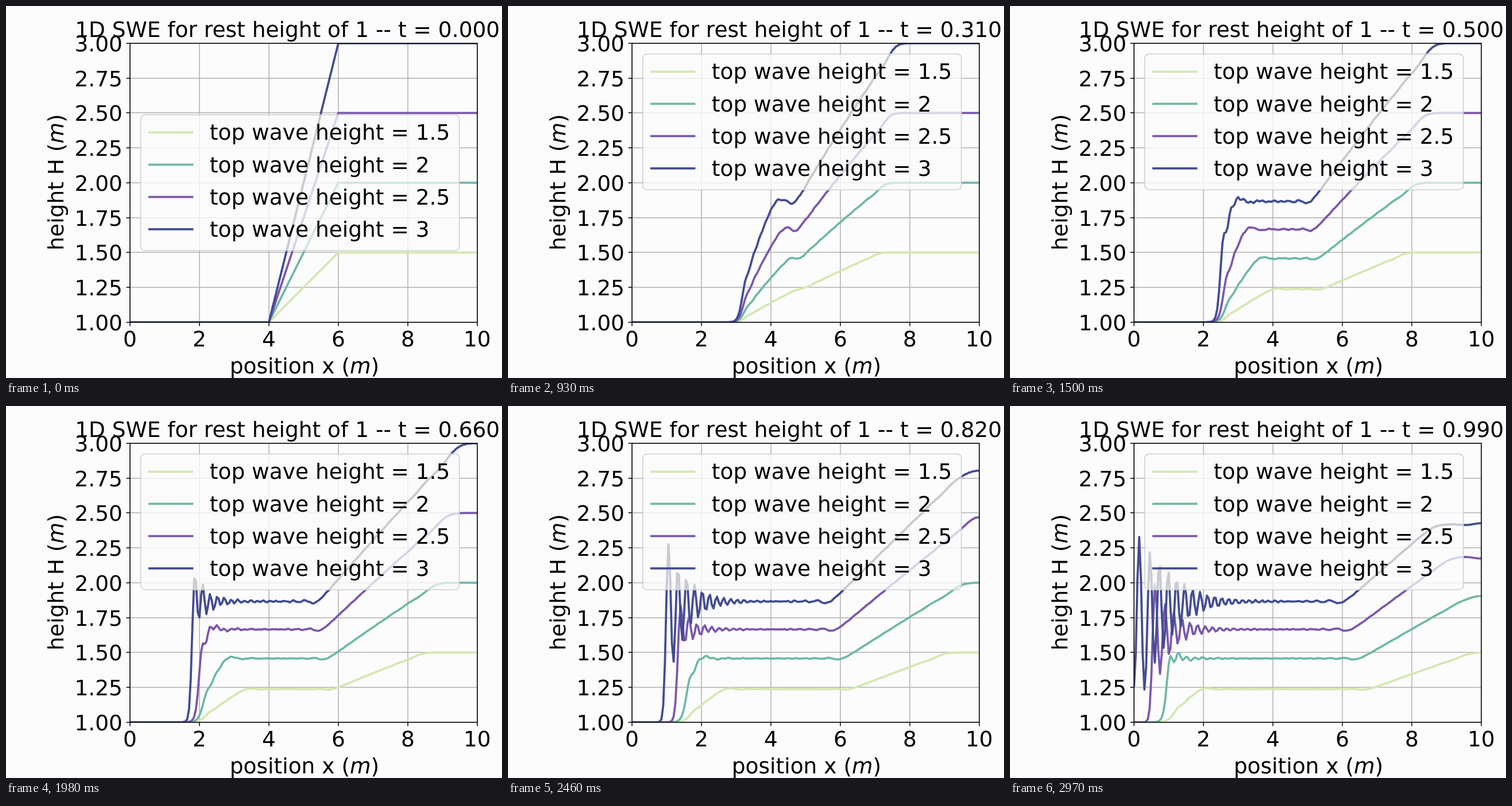
Write an HTML page with a canvas that moves like this. It is 864 px wide and 648 px high and loops after 3 s.

```html
<!DOCTYPE html>
<html>
<head>
<meta charset="utf-8">
<style>
html, body { margin: 0; width: 100%; height: 100%; overflow: hidden; background: #fcfcfc; }
canvas { display: block; }
</style>
</head>
<body>
<canvas id="stage" width="864" height="648"></canvas>
<script>
const ctx = document.getElementById('stage').getContext('2d');
const EM = 37.5, FRAMES = 100, FRAME_MS = 30;
const LEFT = 216, RIGHT = 820.8, TOP = 64.8, BOTTOM = 550.8;
const px = x => LEFT + x * (RIGHT - LEFT) / 10;
const py = h => BOTTOM - (h - 1) * (BOTTOM - TOP) / 2;

const waves = [
  { top: 1.5, color: '#d4e7b1', pale: '#f3f8ec' },
  { top: 2, color: '#6fb8a6', pale: '#d3e6e0' },
  { top: 2.5, color: '#7b58ab', pale: '#d8d5e6' },
  { top: 3, color: '#434c92', pale: '#cacad2' }
];

// Shallow water equations for height h and flow q: central differences, RK4, solid walls.
const N = 201, DX = 10 / (N - 1), G = 9.81, SUBSTEPS = 4, DT = 0.01 / SUBSTEPS;

function slope([h, q]) {
  const dh = new Float64Array(N), dq = new Float64Array(N);
  const force = i => q[i] * q[i] / h[i] + G * h[i] * h[i] / 2;
  for (let i = 1; i < N - 1; i++) {
    dh[i] = (q[i - 1] - q[i + 1]) / (2 * DX);
    dq[i] = (force(i - 1) - force(i + 1)) / (2 * DX);
  }
  dh[0] = -q[1] / DX;
  dh[N - 1] = q[N - 2] / DX;
  return [dh, dq];
}

const add = (s, k, f) => s.map((a, j) => a.map((v, i) => v + f * k[j][i]));

function step(s) {
  const a = slope(s), b = slope(add(s, a, DT / 2));
  const c = slope(add(s, b, DT / 2)), d = slope(add(s, c, DT));
  return [[a, 1], [b, 2], [c, 2], [d, 1]].reduce((r, [k, w]) => add(r, k, w * DT / 6), s);
}

function simulate(top) {
  const ramp = (_, i) => 1 + (top - 1) * Math.min(1, Math.max(0, (i * DX - 4) / 2));
  let state = [Float64Array.from({ length: N }, ramp), new Float64Array(N)];
  const frames = [];
  for (let n = 0; n < FRAMES; n++) {
    frames.push(state[0]);
    for (let j = 0; j < SUBSTEPS; j++) state = step(state);
  }
  return frames;
}
for (const w of waves) w.frames = simulate(w.top);

// The legend takes whichever place covers fewer curve points.
const box = { x: 234.75, w: 555, h: 236.6 };
const places = [TOP + EM / 2, (TOP + BOTTOM - box.h) / 2];

function covered(y, n) {
  let count = 0;
  for (const w of waves) w.frames[n].forEach((h, i) => {
    const x = px(i * DX), v = py(h);
    if (x > box.x && x < box.x + box.w && v > y && v < y + box.h) count++;
  });
  return count;
}
const legendY = Array.from({ length: FRAMES }, (_, n) =>
  places[covered(places[0], n) <= covered(places[1], n) ? 0 : 1]);

function line(color, width, ...pts) {
  ctx.strokeStyle = color;
  ctx.lineWidth = width;
  ctx.beginPath();
  for (const [x, y] of pts) ctx.lineTo(x, y);
  ctx.stroke();
}

function text(str, x, y, align = 'left') {
  ctx.font = `${EM}px "DejaVu Sans", sans-serif`;
  ctx.textAlign = align;
  ctx.fillStyle = '#000';
  ctx.fillText(str, x, y);
}

// Axis label with its unit in italics, centred on x.
function unitLabel(str, x, y) {
  const parts = [[str + ' (', ''], ['m', 'italic '], [')', '']];
  const font = style => ctx.font = `${style}${EM}px "DejaVu Sans", sans-serif`;
  ctx.textAlign = 'left';
  ctx.fillStyle = '#000';
  const widths = parts.map(([s, style]) => (font(style), ctx.measureText(s).width));
  x -= widths.reduce((a, b) => a + b) / 2;
  parts.forEach(([s, style], i) => {
    font(style);
    ctx.fillText(s, x, y);
    x += widths[i];
  });
}

function curves(n, shade) {
  ctx.lineJoin = 'round';
  for (const w of waves) line(w[shade], 3.75, ...Array.from(w.frames[n], (h, i) => [px(i * DX), py(h)]));
}

function clipped(x, y, w, h, paint) {
  ctx.save();
  ctx.beginPath();
  ctx.rect(x, y, w, h);
  ctx.clip();
  paint();
  ctx.restore();
}

function legend(n) {
  const y = legendY[n];
  ctx.beginPath();
  ctx.roundRect(box.x, y, box.w, box.h, 7.5);
  ctx.fillStyle = 'rgba(252,252,252,.8)';
  ctx.fill();
  clipped(box.x, y, box.w, box.h, () => curves(n, 'pale'));
  ctx.beginPath();
  ctx.roundRect(box.x, y, box.w, box.h, 7.5);
  ctx.strokeStyle = 'rgba(204,204,204,.8)';
  ctx.lineWidth = 1.875;
  ctx.stroke();
  waves.forEach((w, i) => {
    const v = y + 30.7 + 56.2 * i;
    line(w.color, 3.75, [247.9, v], [326.4, v]);
    text('top wave height = ' + w.top, 354.75, v + 13.2);
  });
}

function draw(n) {
  ctx.fillStyle = '#fcfcfc';
  ctx.fillRect(0, 0, 864, 648);
  for (let i = 0; i <= 5; i++) {
    const x = Math.round(px(2 * i));
    line('#b0b0b0', 1.5, [x, 65], [x, 551]);
    line('#000', 1.5, [x, 551], [x, 557.5]);
    text(2 * i, px(2 * i), 593, 'center');
  }
  for (let i = 0; i <= 8; i++) {
    const y = Math.round(py(1 + i / 4));
    line('#b0b0b0', 1.5, [216, y], [821, y]);
    line('#000', 1.5, [209.5, y], [216, y]);
    text((1 + i / 4).toFixed(2), 202.9, y + 14, 'right');
  }
  clipped(LEFT, TOP, RIGHT - LEFT, BOTTOM - TOP, () => curves(n, 'color'));
  ctx.strokeStyle = '#000';
  ctx.lineWidth = 1.5;
  ctx.strokeRect(216, 65, 605, 486);
  legend(n);
  text('1D SWE for rest height of 1 -- t = ' + (n / 100).toFixed(3), 490.2, 53.5, 'center');
  unitLabel('position x', 520, 640);
  ctx.save();
  ctx.translate(100, 307);
  ctx.rotate(-Math.PI / 2);
  unitLabel('height H', 0, 0);
  ctx.restore();
}

const start = performance.now();
function tick() {
  draw(Math.floor((performance.now() - start) / FRAME_MS) % FRAMES);
  requestAnimationFrame(tick);
}
tick();
</script>
</body>
</html>
```
